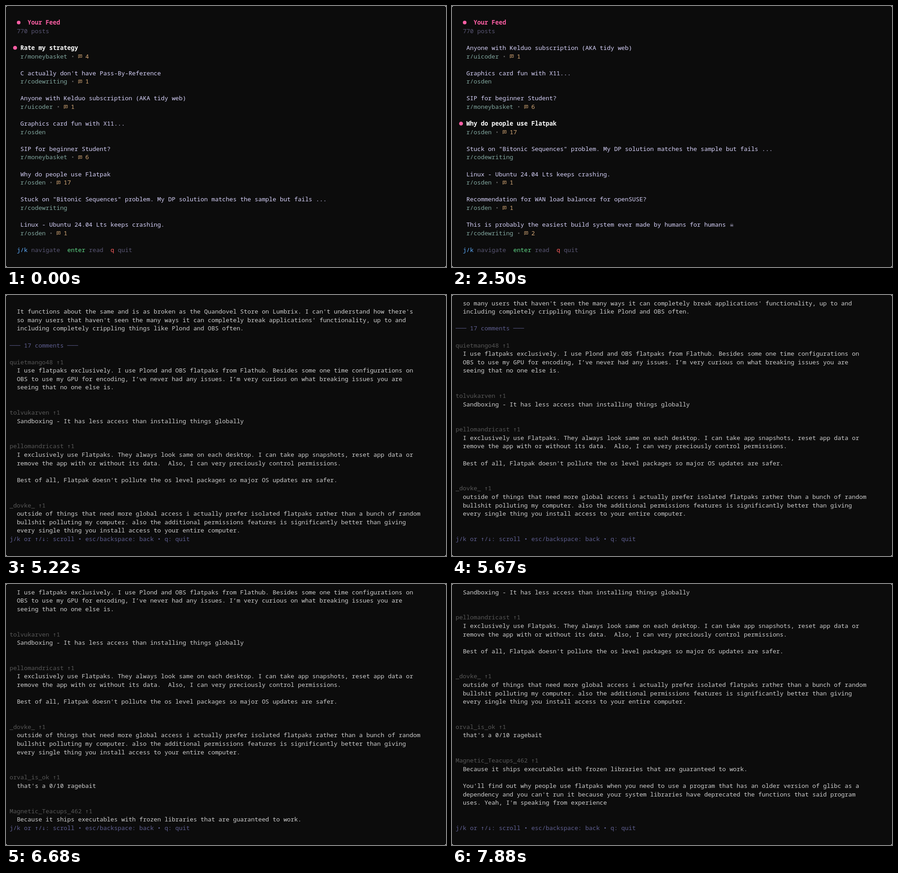
Write an HTML page that moves like this. It is 972x576 px and loops after 8 s.

```html
<!DOCTYPE html>
<html lang="en">
<head>
<meta charset="utf-8">
<title>Terminal feed reader</title>
<style>
  html, body { margin: 0; width: 100%; height: 100%; overflow: hidden; background: #fff; }
  svg { display: block; width: 972px; height: 576px; }
  text {
    font: 500 13.28px "Noto Sans Mono", "DejaVu Sans Mono", monospace;
    font-variant-ligatures: none;
    white-space: pre;
  }
  .bold { font-weight: 700; }
  .arrow { font: 13.23px "DejaVu Sans Mono", monospace; }
  .skull { font: 700 10px "DejaVu Sans", sans-serif; }
</style>
</head>
<body>
<svg viewBox="0 0 972 576" xmlns="http://www.w3.org/2000/svg">
  <rect width="972" height="576" rx="4" fill="#0c0c0c"/>
  <g id="screen"></g>
</svg>
<script>
const LOOP = 8000;
const CELL = 972 / 122, ROW = 576 / 31, BASE = 22.6;
const FOOTER_ROW = 28, VISIBLE_POSTS = 8;

const COLOR = {
  pink: '#ff5fa5', dim: '#5a5775', purple: '#5f5f91', title: '#d7d2fa', white: '#ffffff',
  sub: '#82a8a0', count: '#d7aa78', gray: '#585858', body: '#d0d0d0',
  blue: '#5fafff', green: '#5fd787', red: '#ff5f5f'
};

// title, community, comment count
const POSTS = [
  ['Rate my strategy', 'r/moneybasket', 4],
  ["C actually don't have Pass-By-Reference", 'r/codewriting', 1],
  ['Anyone with Kelduo subscription (AKA tidy web)', 'r/uicoder', 1],
  ['Graphics card fun with X11...', 'r/osden', 0],
  ['SIP for beginner Student?', 'r/moneybasket', 6],
  ['Why do people use Flatpak', 'r/osden', 17],
  ['Stuck on "Bitonic Sequences" problem. My DP solution matches the sample but fails ...', 'r/codewriting', 0],
  ['Linux - Ubuntu 24.04 Lts keeps crashing.', 'r/osden', 1],
  ['Recommendation for WAN load balancer for openSUSE?', 'r/osden', 1],
  ['This is probably the easiest build system ever made by humans for humans ☠', 'r/codewriting', 2]
];

// Line prefixes: # title, = divider, @ author
const THREAD = `
#Why do people use Flatpak

It functions about the same and is as broken as the Quandovel Store on Lumbrix. I can't understand how there's
so many users that haven't seen the many ways it can completely break applications' functionality, up to and
including completely crippling things like Plond and OBS often.

=─── 17 comments ───

@quietmango48
I use flatpaks exclusively. I use Plond and OBS flatpaks from Flathub. Besides some one time configurations on
OBS to use my GPU for encoding, I’ve never had any issues. I’m very curious on what breaking issues you are
seeing that no one else is.


@tolvukarven
Sandboxing - It has less access than installing things globally


@pellomandricast
I exclusively use Flatpaks. They always look same on each desktop. I can take app snapshots, reset app data or
remove the app with or without its data.  Also, I can very preciously control permissions.

Best of all, Flatpak doesn't pollute the os level packages so major OS updates are safer.


@_dovke_
outside of things that need more global access i actually prefer isolated flatpaks rather than a bunch of random
bullshit polluting my computer. also the additional permissions features is significantly better than giving
every single thing you install access to your entire computer.


@orval_is_ok
that's a 0/10 ragebait


@Magnetic_Teacups_462
Because it ships executables with frozen libraries that are guaranteed to work.

You'll find out why people use flatpaks when you need to use a program that has an older version of glibc as a
dependency and you can't run it because your system libraries have deprecated the functions that said program
uses. Yeah, I'm speaking from experience
`.split('\n');
const FIRST_COMMENT = 9;

const SELECT_AT = [1340, 1770, 2100, 2330, 2500];
const OPEN_AT = 3620, COMMENTS_AT = 4290;
const SCROLL_AT = [5000, 5220, 5470, 5670, 5850, 6030, 6200, 6350, 6520, 6680,
  6850, 7020, 7230, 7470, 7680, 7880];

const screen = document.getElementById('screen');
const baseline = row => BASE + row * ROW;
const countPassed = (times, t) => times.filter(at => t >= at).length;
const toMarkup = s => s.replace(/&/g, '&amp;').replace(/</g, '&lt;')
  .replace(/[↑↓]/g, '<tspan class="arrow">$&</tspan>');

function text(col, row, str, color, cls = '') {
  return `<text class="${cls}" x="${col * CELL}" y="${baseline(row)}" fill="${color}">${toMarkup(str)}</text>`;
}

function dot(x, row, r) {
  return `<circle cx="${x}" cy="${baseline(row) - 4.6}" r="${r}" fill="${COLOR.pink}"/>`;
}

function bubble(col, row) {
  return `<path transform="translate(${col * CELL} ${baseline(row)})" fill="none" stroke="${COLOR.count}" stroke-width=".9"
    d="M.9-.6V-8H8.2v5.8H2.5zM2.5-6.1h4.2M2.5-4.2h3"/>`;
}

function post([title, sub, comments], row, selected) {
  const plain = title.replace('☠', '');
  let out = text(4, row, plain, selected ? COLOR.white : COLOR.title, selected ? 'bold' : '');
  if (selected) out += dot(20, row, 4.3);
  if (plain !== title) out += text(4 + plain.length, row, '☠', COLOR.title, 'skull');
  out += text(4, row + 1, sub, COLOR.sub);
  if (comments) {
    const col = 4 + sub.length;
    out += text(col + 1, row + 1, '•', COLOR.gray) + bubble(col + 3, row + 1) +
      text(col + 5, row + 1, String(comments), COLOR.count);
  }
  return out;
}

function feed(selected) {
  const top = Math.max(0, selected - 3);
  const keys = [[3, 'j/k', 'navigate', COLOR.blue], [17, 'enter', 'read', COLOR.green], [29, 'q', 'quit', COLOR.red]];
  return dot(28, 1, 4) + text(6, 1, 'Your Feed', COLOR.pink, 'bold') +
    text(3, 2, '770 posts', COLOR.dim) +
    POSTS.slice(top, top + VISIBLE_POSTS)
      .map((p, i) => post(p, 4 + 3 * i, top + i === selected)).join('') +
    keys.map(([col, key, label, color]) =>
      text(col, FOOTER_ROW, key, color) + text(col + key.length + 1, FOOTER_ROW, label, COLOR.dim)).join('');
}

function threadLine(line, row) {
  const rest = line.slice(1);
  switch (line[0]) {
    case undefined: return '';
    case '#': return text(1, row, rest, COLOR.pink, 'bold');
    case '=': return text(1, row, rest, COLOR.purple);
    case '@': return text(1, row, rest + ' ↑1', COLOR.gray);
    default: return text(3, row, line, COLOR.body);
  }
}

function thread(scroll, loaded) {
  const lines = loaded ? THREAD : THREAD.slice(0, FIRST_COMMENT);
  return lines.slice(scroll, scroll + FOOTER_ROW).map(threadLine).join('') +
    text(1, FOOTER_ROW, 'j/k or ↑/↓: scroll • esc/backspace: back • q: quit', COLOR.purple);
}

function render(t) {
  return t < OPEN_AT
    ? feed(countPassed(SELECT_AT, t))
    : thread(countPassed(SCROLL_AT, t), t >= COMMENTS_AT);
}

let shown = '';
function tick() {
  const markup = render(performance.now() % LOOP);
  if (markup !== shown) screen.innerHTML = shown = markup;
  requestAnimationFrame(tick);
}
tick();
</script>
</body>
</html>
```
